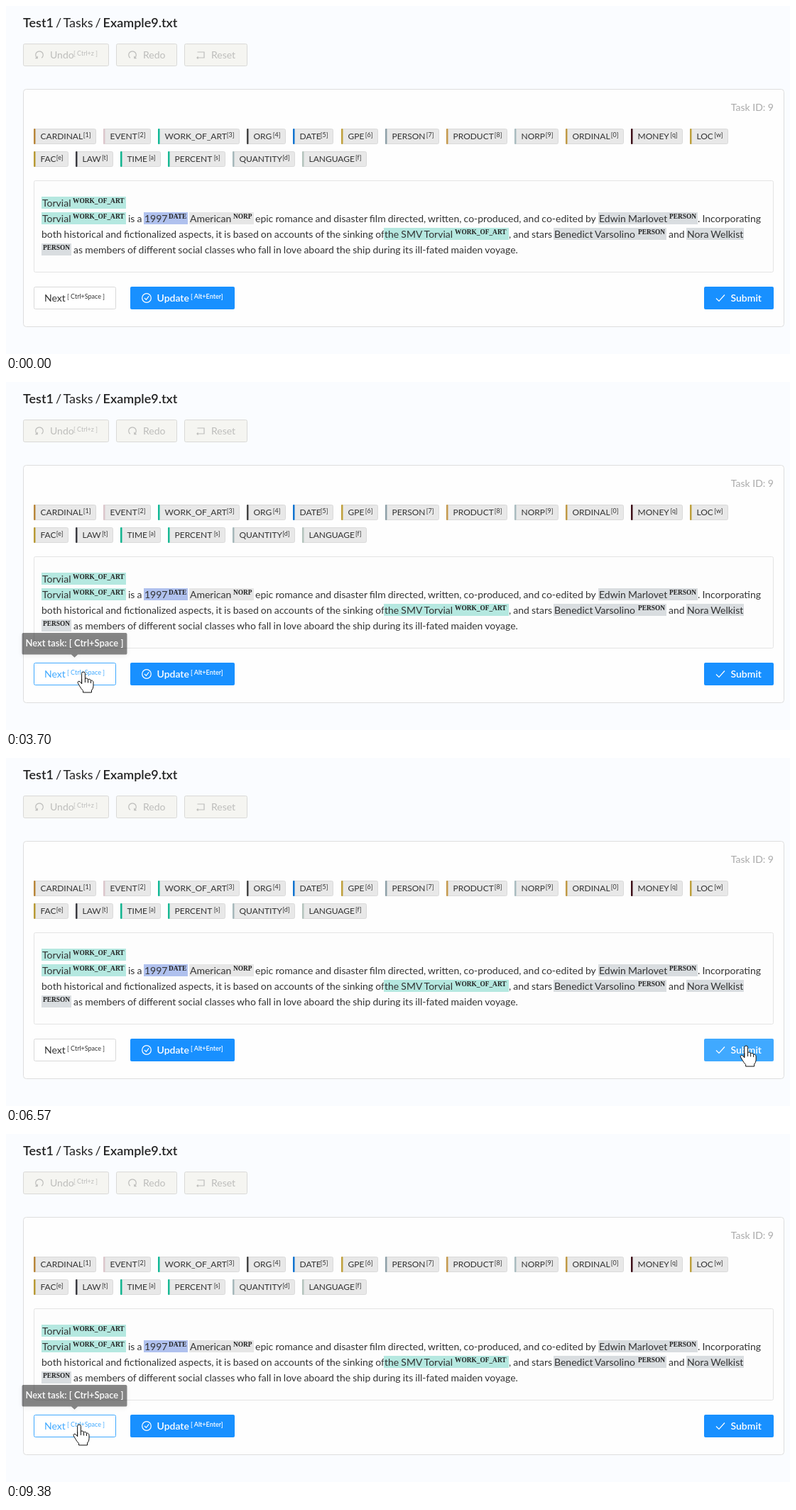
An HTML page for the animation above (9420 ms loop, 1104 by 491 pixels).

```html
<!DOCTYPE html>
<html lang="en">
<head>
<meta charset="utf-8">
<title>Text annotation</title>
<style>
  html, body { margin: 0; width: 100%; height: 100%; overflow: hidden; background: #fafcff; }
  svg { display: block; width: 1104px; height: 491px; font: 14px Lato, sans-serif; fill: #333; }
  .title { font-size: 18px; fill: #222; word-spacing: -.095em; }
  .passage { word-spacing: -.033em; }
  .key { font-size: 9px; }
  .bold { font-weight: 600; }
  .label { font: bold 9.4px "Liberation Serif", serif; fill: #222; }
  .line { fill: none; stroke-width: 1.2; }
  .cursor { fill: #fff; stroke: #111; stroke-linejoin: round; }
  .tip { filter: drop-shadow(0 2px 4px rgba(0, 0, 0, .15)); }
</style>
</head>
<body>
<svg id="stage" viewBox="0 0 1104 491"></svg>
<script>
const LOOP = 9420;
const stage = document.getElementById('stage');

const text = (x, y, str, attrs = '') => `<text x="${x}" y="${y}" ${attrs}>${str}</text>`;
const rect = (x, y, w, h, fill, attrs = '') =>
  `<rect x="${x}" y="${y}" width="${w}" height="${h}" fill="${fill}" ${attrs}/>`;
const box = (x, y, w, h, fill, stroke, r = 2) =>
  rect(x + .5, y + .5, w - 1, h - 1, fill, `stroke="${stroke}" rx="${r}"`);
const line = (d, stroke, attrs = '') => `<path class="line" d="${d}" stroke="${stroke}" ${attrs}/>`;

// Toolbar
const GREY = '#bdbdbb';
const turn = 'M-3.2 4.3A5.3 5.3 0 1 1 3.2 4.3M-5.6 4.6H-2.8V1.8';
const tool = (x, w, name, icon) =>
  box(x, 53, w, 32, '#f5f5f1', '#d9d9d7') + text(x + 38, 74, name, `fill="${GREY}"`) +
  `<g transform="translate(${x + 23} 69)">${icon}</g>`;

function header() {
  return `<text x="24" y="30" class="title"><tspan class="bold">Test1</tspan> / Tasks / ` +
    `<tspan class="bold">Example9.txt</tspan></text>` +
    tool(24, 121, 'Undo', line(turn, GREY)) +
    text(95, 70, '[ Ctrl+z ]', `class="key" fill="${GREY}"`) +
    tool(155, 86, 'Redo', line(turn, GREY, 'transform="scale(-1 1)"')) +
    tool(251, 89, 'Reset', line('M-4.5 -4H5V4H-5M-3.5 2.5L-5 4L-3.5 5.5', GREY)) +
    box(24, 117, 1072, 336, '#fefefe', '#dedede', 4) +
    text(1081, 148, 'Task ID: 9', 'text-anchor="end" fill="#aaa"');
}

// Labels: name, key, x, width, colour
const rows = [
  [['CARDINAL', 1, 39, 88, '#b8863b'], ['EVENT', 2, 137, 67, '#dcc6cc'],
   ['WORK_OF_ART', 3, 214, 115, '#12b997'], ['ORG', 4, 339, 55, '#444'],
   ['DATE', 5, 404, 57, '#1274d0'], ['GPE', 6, 472, 52, '#c0a03c'],
   ['PERSON', 7, 534, 76, '#8fa1a9'], ['PRODUCT', 8, 620, 86, '#c59a4e'],
   ['NORP', 9, 716, 62, '#a9bcc0'], ['ORDINAL', 0, 788, 82, '#c09a45'],
   ['MONEY', 'q', 880, 73, '#3d0f18'], ['LOC', 'w', 963, 54, '#bd9f3c']],
  [['FAC', 'e', 39, 49, '#b89a35'], ['LAW', 't', 98, 53, '#3a3a40'],
   ['TIME', 'a', 161, 57, '#12b48f'], ['PERCENT', 's', 228, 81, '#18b994'],
   ['QUANTITY', 'd', 319, 88, '#a5b8ba'], ['LANGUAGE', 'f', 417, 91, '#b4c4bd']]
];
const tags = () => rows.map((row, i) => row.map(([name, key, x, w, color]) => {
  const y = 173 + i * 32;
  return box(x, y, w, 22, '#e8e8e8', '#dadada') + rect(x, y, 2.5, 22, color, 'rx="1"') +
    text(x + 9.5, y + 15, name, 'font-size="12"') +
    text(x + w - 7.5, y + 12, `[${key}]`, 'class="key" text-anchor="end"');
}).join('')).join('');

// Annotated passage
const ART = '#b5e8e0', DATE = '#b0c1ee', NORP = '#e6e6e6', PERSON = '#d9dde0';
const mark = (x, row, w, fill, str, label, labelX) => {
  const y = 283 + row * 22;
  return rect(x, y - 14, w, 17, fill) + text(x + 1, y, str) + text(labelX, y - 5, label, 'class="label"');
};
function passage() {
  return box(39, 246, 1042, 130, '#fdfdfd', '#e4e4e4') + '<g class="passage">' +
    mark(50, 0, 119, ART, 'Torvial', 'WORK_OF_ART', 94) +
    mark(50, 1, 119, ART, 'Torvial', 'WORK_OF_ART', 94) +
    text(172, 305, 'is a') +
    mark(194, 1, 62, DATE, '1997', 'DATE', 229) +
    mark(258, 1, 91, NORP, 'American', 'NORP', 320) +
    text(351, 305, 'epic romance and disaster film directed, written, co-produced, and co-edited by') +
    mark(834, 1, 140, PERSON, 'Edwin Marlovet', 'PERSON', 934) +
    text(974, 305, '. Incorporating') +
    text(50, 327, 'both historical and fictionalized aspects, it is based on accounts of the sinking of') +
    mark(532, 2, 176, ART, 'the SMV Torvial', 'WORK_OF_ART', 632) +
    text(708, 327, ', and stars') +
    mark(771, 2, 159, PERSON, 'Benedict Varsolino', 'PERSON', 890) +
    text(933, 327, 'and') +
    mark(958, 2, 81, PERSON, 'Nora Welkist', '', 0) +
    mark(50, 3, 42, PERSON, '', 'PERSON', 52) +
    text(95, 349, 'as members of different social classes who fall in love aboard the ship ' +
      'during its ill-fated maiden voyage.') + '</g>';
}

// Bottom buttons, tooltips and cursor
const white = 'class="bold" fill="#fff"';
const button = (id, x, w, content) => `<g id="${id}">${rect(x, 396, w, 32, '#1890ff', 'rx="2"')}${content}</g>`;
function actions() {
  return `<g id="next">${box(39, 396, 116, 32, '#fff', 'currentColor')}<g id="nextText">` +
    text(54, 417, 'Next') + text(86, 413, '[ Ctrl+Space ]', 'class="key"') + '</g></g>' +
    button('update', 175, 147, text(212.5, 417, 'Update', white) +
      text(260, 413, '[ Alt+Enter]', 'class="key bold" fill="#fff"') +
      '<circle class="line" cx="198" cy="412" r="6.3" stroke="#fff"/>' +
      line('M195 412L197.4 414.4L201.2 409.4', '#fff')) +
    button('submit', 983, 98, text(1020.5, 417, 'Submit', white) +
      line('M1000 412.5L1004 416.5L1012 407.5', '#fff'));
}
const tooltip = (id, cx, w, str) => `<g id="${id}" class="tip"><path fill="#000" fill-opacity=".75"
  d="M${cx - w / 2 + 2} 351h${w - 4}q2 0 2 2v29q0 2 -2 2H${cx + 5}l-5 4.5l-5 -4.5H${cx - w / 2 + 2}q-2 0 -2 -2v-29q0 -2 2 -2z"/>` +
  text(cx, 372, str, white + ' text-anchor="middle"') + '</g>';
const arrow = '<path id="arrow" class="cursor" d="M.5 .5V20.6L5.2 16.2L8.8 24.6L12.2 23.1L8.6 15H15.4Z"/>';
const hand = `<g id="hand" class="cursor"><path d="M-2.4 2.2Q-2.4 0 0 0Q2.4 0 2.4 2.2V10Q2.6 8.6 4.6 9
  Q6.4 9.4 6.5 11.2Q7 10 8.8 10.4Q10.4 10.9 10.5 12.6Q11.2 11.8 12.6 12.3Q14 13 14 15V20Q14 23.5 11.5 26V29H-.5V26.5
  Q-3.5 23.5 -5 20.5L-7.6 16.2Q-8.6 14 -7 13.2Q-5 12.6 -2.4 16.5Z"/>
  <path fill="none" d="M-2.4 10V17M2.4 10V15M6.5 11V15.5M10.5 12.5V16"/></g>`;

stage.innerHTML = header() + tags() + passage() + actions() +
  tooltip('updateTip', 249, 196, 'Update this task: [ Alt+Enter ]') +
  tooltip('nextTip', 96.5, 160, 'Next task: [ Ctrl+Space ]') +
  `<g id="cursor">${arrow}${hand}</g>`;

// Timeline: [start, end] spans and [time, x, y] cursor stops
const hovers = {
  update: [[1040, 2710], [7080, 8440]],
  next: [[2770, 4300], [8500, LOOP]],
  submit: [[4540, 6640]]
};
const tips = {
  updateTip: { cx: 249, spans: [[1830, 2820], [7868, 8550]] },
  nextTip: { cx: 96.5, spans: [[3688, 4420], [9368, LOOP]] }
};
const stops = [
  [290, 521, 479], [500, 403, 396], [860, 403, 396], [1040, 322, 399], [1270, 269, 402],
  [2570, 269, 402], [2710, 175, 404], [2770, 155, 406], [3130, 109, 409],
  [4230, 109, 409], [4300, 155, 409], [4440, 787, 407], [4470, 787, 407],
  [4540, 983, 408], [4700, 1048, 409], [5090, 1043, 406],
  [6570, 1043, 406], [6640, 983, 410], [7080, 322, 413], [7320, 251, 412],
  [8330, 251, 412], [8440, 175, 412], [8500, 155, 411], [8820, 103, 410], [LOOP, 103, 410]
];

const $ = id => document.getElementById(id);
const clamp = u => Math.min(1, Math.max(0, u));
const inOut = u => u < .5 ? 4 * u ** 3 : 1 - 4 * (1 - u) ** 3;
const quickOut = u => 1 - (1 - u) ** 7;
const level = (t, spans, ms, easeIn) => spans.reduce((sum, [a, b]) =>
  sum + easeIn(clamp((t - a) / ms)) - inOut(clamp((t - b) / ms)), 0);
const mix = (a, b, p) => `rgb(${a.map((v, i) => Math.round(v + (b[i] - v) * p))})`;

const BLUE = [24, 144, 255], LIGHT = [64, 169, 255];

function cursorAt(t) {
  const i = stops.findIndex(s => s[0] > t);
  const [t0, x0, y0] = stops[i - 1], [t1, x1, y1] = stops[i];
  const p = (t - t0) / (t1 - t0);
  return [x0 + (x1 - x0) * p, y0 + (y1 - y0) * p];
}

function draw(t) {
  const hover = id => level(t, hovers[id], 300, inOut);
  for (const id of ['update', 'submit'])
    $(id).firstChild.setAttribute('fill', mix(BLUE, LIGHT, hover(id)));
  $('next').style.color = mix([217, 217, 217], LIGHT, hover('next'));
  $('nextText').style.fill = mix([51, 51, 51], LIGHT, hover('next'));

  for (const id in tips) {
    const { cx, spans } = tips[id], p = level(t, spans, 100, quickOut), s = .8 + .2 * p;
    $(id).style.opacity = p;
    $(id).setAttribute('transform', `translate(${cx * (1 - s)} ${391 * (1 - s)}) scale(${s})`);
  }

  const shown = t >= stops[0][0];
  $('cursor').style.display = shown ? '' : 'none';
  if (!shown) return;
  const over = Object.values(hovers).flat().some(([a, b]) => t >= a && t < b);
  $('arrow').style.display = over ? 'none' : '';
  $('hand').style.display = over ? '' : 'none';
  $('cursor').setAttribute('transform', `translate(${cursorAt(t)})`);
}

const start = performance.now();
function frame() {
  draw((performance.now() - start) % LOOP);
  requestAnimationFrame(frame);
}
frame();
</script>
</body>
</html>
```
